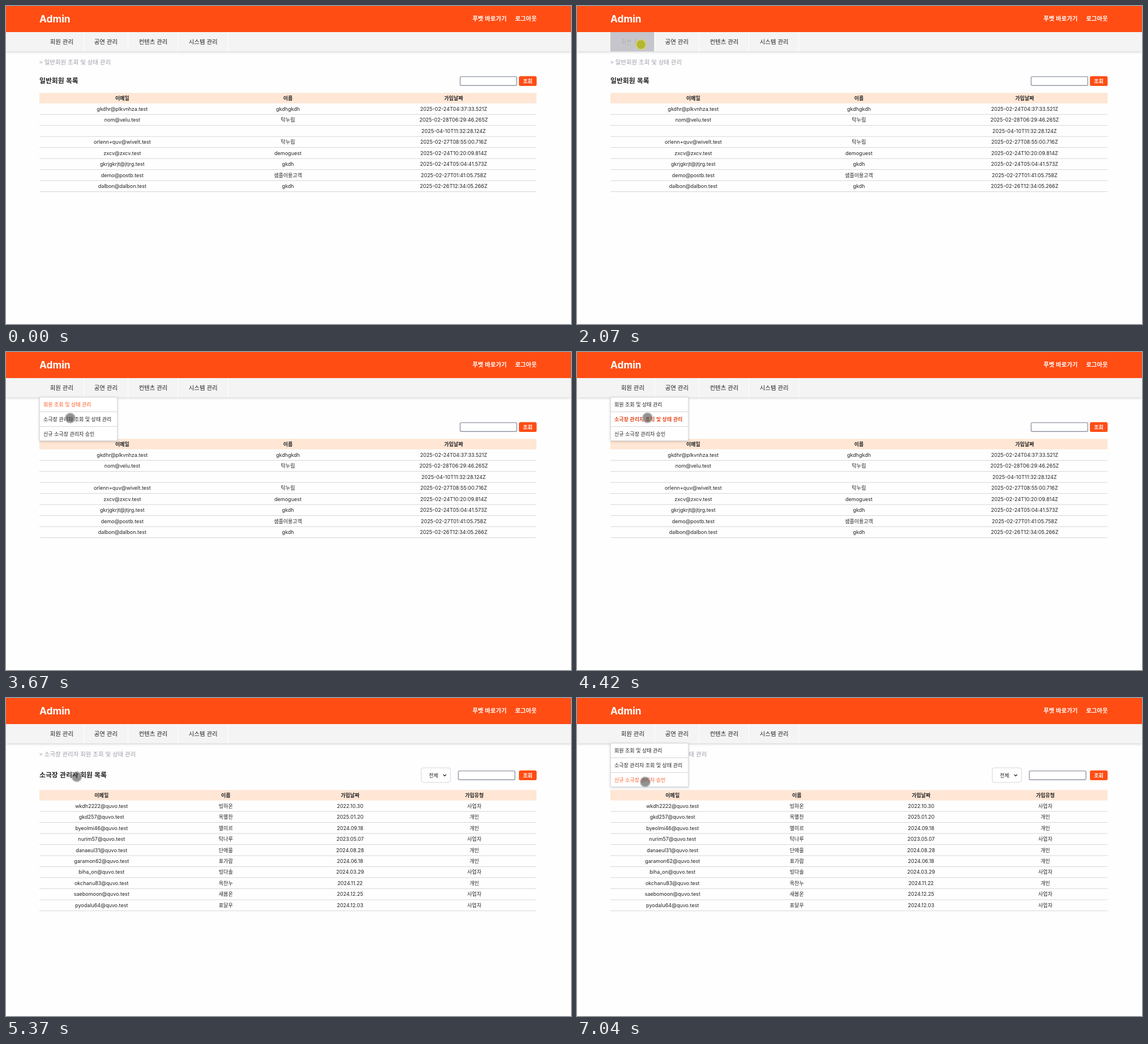
These frames come from a looping animation (998 px wide and 561 px high, 8000 ms). An HTML page:

```html
<!DOCTYPE html>
<html lang="ko">
<head>
<meta charset="utf-8">
<title>Admin</title>
<style>
  html, body { margin: 0; width: 100%; height: 100%; overflow: hidden; background: #fefefe; }
  svg { display: block; width: 998px; height: 561px; }
  text { font-family: "Noto Sans CJK KR", "Noto Sans CJK", "Noto Sans KR", sans-serif; white-space: pre; }
  .latin { font-family: Inter, sans-serif; }
  .shadow { filter: drop-shadow(0 1px 2px rgba(0, 0, 0, .2)); }
</style>
</head>
<body>
<svg id="stage" viewBox="0 0 998 561"></svg>
<script>
const ORANGE = '#ff4d14', INK = '#222', LINE = '#d3d6db';
const LOOP = 8000;

const text = (x, y, str, { size = 9, weight = 400, fill = INK, anchor = 'start', id = '' } = {}) => {
  const latin = /[가-힣>]/.test(str) ? '' : 'class="latin"';
  return `<text id="${id}" ${latin} x="${x}" y="${y}" font-size="${size}" font-weight="${weight}" fill="${fill}" text-anchor="${anchor}">${str.replace('>', '&gt;')}</text>`;
};
const rect = (x, y, w, h, fill, extra = '') =>
  `<rect x="${x}" y="${y}" width="${w}" height="${h}" fill="${fill}" ${extra}/>`;
const hline = (x1, x2, y) => `<path d="M${x1} ${y}H${x2}" stroke="${LINE}"/>`;

function table(top, headH, heads, rows) {
  const colW = 878 / heads.length;
  const cells = (list, y, weight) => list.map((s, i) =>
    text(59 + colW * (i + .5), y, s, { weight, anchor: 'middle' })).join('');
  return rect(59, top, 878, headH, '#ffe6d5') + cells(heads, top + headH / 2 + 3.4, 700) +
    rows.map((row, i) => {
      const bottom = top + headH + 19.48 * (i + 1);
      return cells(row, bottom - 6.5, 400) + hline(59, 937, bottom);
    }).join('');
}

function search(inputX, y) {
  return rect(inputX, y - 7.8, 100, 15.6, '#fff', 'rx="2" stroke="#9297a5" stroke-width="1.4"') +
    rect(906, y - 8.7, 31.3, 17.4, ORANGE, 'rx="3.2"') +
    text(921.6, y + 3.4, '조회', { weight: 700, fill: '#fff', anchor: 'middle' });
}

const crumb = str => text(59, 102.8, '> ' + str, { size: 10.45, fill: '#9c9ea8' });
const heading = (y, str) => text(59, y, str, { size: 11.85, weight: 700 });

const members = crumb('일반회원 조회 및 상태 관리') + heading(135.5, '일반회원 목록') + search(802.2, 132.4) +
  table(153.3, 18.4, ['이메일', '이름', '가입날짜'], [
    ['gkdhr@plkvnhza.test', 'gkdhgkdh', '2025-02-24T04:37:33.521Z'],
    ['nom@velu.test', '탁누림', '2025-02-28T06:29:46.265Z'],
    ['', '', '2025-04-10T11:32:28.124Z'],
    ['orlenn+quv@wivelt.test', '탁누림', '2025-02-27T08:55:00.716Z'],
    ['zxcv@zxcv.test', 'demoguest', '2025-02-24T10:20:09.814Z'],
    ['gkrjgkrjt@jtjrg.test', 'gkdh', '2025-02-24T05:04:41.573Z'],
    ['demo@postb.test', '샘플이용고객', '2025-02-27T01:41:05.758Z'],
    ['dalbon@dalbon.test', 'gkdh', '2025-02-26T12:34:05.266Z'],
  ]);

const managers = crumb('소극장 관리자 회원 조회 및 상태 관리') + heading(140.3, '소극장 관리자 회원 목록') +
  rect(733.5, 123.2, 51.6, 25.8, '#fff', `rx="4" stroke="${LINE}"`) + text(747, 139.5, '전체') +
  `<path d="M772.3 135l2.6 2.6 2.6-2.6" fill="none" stroke="${INK}" stroke-width="1.3"/>` + search(799, 136.4) +
  table(162.2, 18.4, ['이메일', '이름', '가입날짜', '가입유형'], [
    ['wkdh2222', '빙하온', '2022.10.30', '사업자'],
    ['gkd257', '옥별찬', '2025.01.20', '개인'],
    ['byeolmi46', '별미르', '2024.09.18', '개인'],
    ['nurim57', '탁나루', '2023.05.07', '사업자'],
    ['danaeul31', '단애울', '2024.08.28', '개인'],
    ['garamon62', '표가람', '2024.06.18', '개인'],
    ['biha_on', '빙다솔', '2024.03.29', '사업자'],
    ['okchanu83', '옥찬누', '2024.11.22', '개인'],
    ['saebomoon', '새봄온', '2024.12.25', '사업자'],
    ['pyodalu64', '표달우', '2024.12.03', '사업자'],
  ].map(([user, ...rest]) => [user + '@quvo.test', ...rest]));

const navText = { size: 10.45, weight: 500 };
const headText = { size: 10.4, weight: 700, fill: '#fff', anchor: 'end' };
const menuItems = ['회원 조회 및 상태 관리', '소극장 관리자 조회 및 상태 관리', '신규 소극장 관리자 승인'];

stage.innerHTML =
  `<g id="pageA">${members}</g><g id="pageB">${managers}</g>` +
  rect(0, 46, 998, 34, '#f4f4f4', 'class="shadow"') +
  rect(0, 0, 998, 46, ORANGE) +
  text(59, 28.7, 'Admin', { size: 17.3, weight: 700, fill: '#fff' }) +
  text(884.3, 26.4, '푸벳 바로가기', headText) + text(937.5, 26.4, '로그아웃', headText) +
  [['회원 관리', 77.7], ['공연 관리', 155.7], ['컨텐츠 관리', 234.5], ['시스템 관리', 322.7]]
    .map(([s, x]) => text(x, 66.9, s, navText)).join('') +
  [137.5, 215.5, 303.5, 391.5].map(x => rect(x - .5, 46, 1, 34, '#fff')).join('') +
  `<g id="navHover">${rect(59, 46, 77.3, 34, '#a19fac')}${text(77.7, 66.9, '회원 관리', { size: 10.45, weight: 700, fill: '#fff' })}</g>` +
  `<g id="menu">${rect(59.5, 80, 137, 76.5, '#fff', `class="shadow" stroke="${LINE}" stroke-width=".8"`)}` +
  hline(60, 196, 105.5) + hline(60, 196, 131.5) +
  menuItems.map((s, i) => text(66, 95.9 + 25.8 * i, s, { id: 'item' + i })).join('') + '</g>' +
  '<g id="cursor"><circle r="8.6" stroke-width="1.8"/></g>';

// Pointer path: time, x, y
const path = [
  [860, 597, 540], [1130, 455, 490], [1390, 306, 396], [1660, 128, 139], [1940, 113, 68],
  [2540, 113, 68], [2800, 114, 89], [3540, 113.5, 89], [3740, 113.5, 131], [3880, 113.5, 131],
  [4420, 124.5, 116], [4960, 124.5, 116], [5170, 125, 139], [5370, 125, 139], [5900, 104, 66],
  [6230, 104, 66], [6440, 121, 159], [6580, 121, 159], [6840, 120.5, 148], [LOOP, 120.5, 148],
];
const clicks = [[2000, 2130], [4820, 4960], [6040, 6170]];
const menuOpen = [[2200, 5370], [6170, LOOP]];
const navHovers = [[2000, 2800], [6170, 6640]];
// Per menu item: hover start, settled, end
const itemHovers = [[3000, 3200, 3940], [4140, 4620, 5370], [6840, 7040, LOOP]];

const within = (t, spans) => spans.some(([a, b]) => t >= a && t < b);
const clamp = v => Math.max(0, Math.min(1, v));
const show = (el, on) => el.setAttribute('visibility', on ? 'visible' : 'hidden');
const get = id => document.getElementById(id);
const [pageA, pageB, navHover, menu, cursor] = ['pageA', 'pageB', 'navHover', 'menu', 'cursor'].map(get);
const items = menuItems.map((_, i) => get('item' + i));
const dot = cursor.firstChild;

function pointerAt(t) {
  const i = Math.max(1, path.findIndex(p => p[0] > t));
  const [[t0, x0, y0], [t1, x1, y1]] = [path[i - 1], path[i]];
  const k = clamp((t - t0) / (t1 - t0));
  return [x0 + (x1 - x0) * k, y0 + (y1 - y0) * k];
}

function draw() {
  const t = performance.now() % LOOP;
  show(pageA, t < 5370);
  show(pageB, t >= 5370);
  show(menu, within(t, menuOpen));
  navHover.setAttribute('opacity', Math.max(...navHovers.map(([a, b]) =>
    Math.min(clamp((t - a) / 130), clamp((b + 170 - t) / 130)))));
  items.forEach((el, i) => {
    const [start, settled, end] = itemHovers[i];
    const hover = t >= start && t < end, bold = hover && t < settled;
    el.setAttribute('fill', bold ? '#e5481d' : hover ? '#ff5a26' : INK);
    el.setAttribute('font-weight', bold ? 700 : 400);
  });
  show(cursor, t >= 860);
  cursor.setAttribute('transform', `translate(${pointerAt(t)})`);
  const pressed = within(t, clicks);
  dot.setAttribute('fill', pressed ? 'rgba(175,178,10,.78)' : 'rgba(60,60,60,.56)');
  dot.setAttribute('stroke', pressed ? '#d3d56a' : '#b9b9b9');
  requestAnimationFrame(draw);
}
draw();
</script>
</body>
</html>
```
